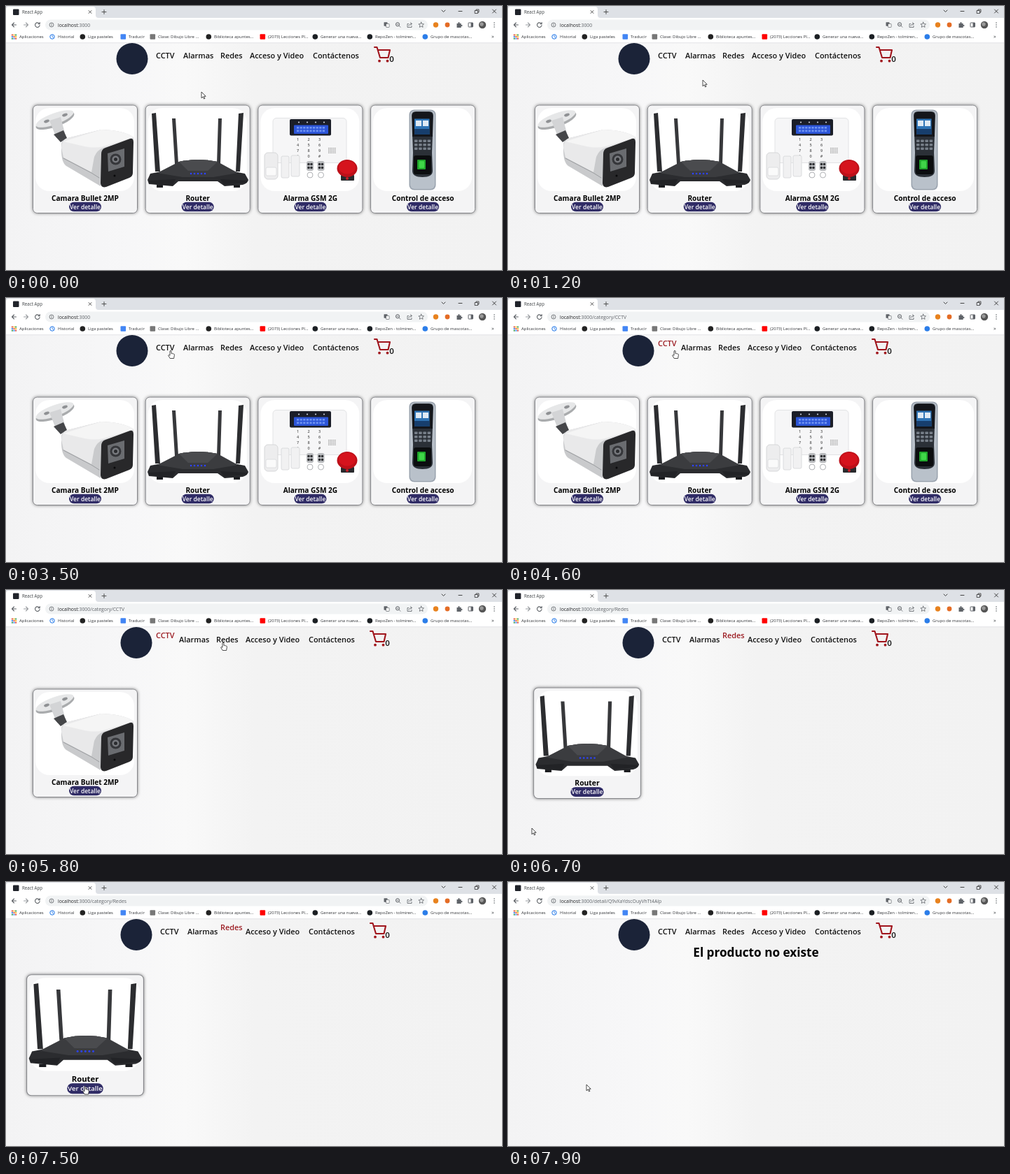
Write an HTML page that moves like this. It is 708 by 378 pixels and loops after 8 s.

```html
<!DOCTYPE html>
<html lang="es">
<head>
<meta charset="utf-8">
<title>React App</title>
<style>
html, body { margin: 0; width: 100%; height: 100%; overflow: hidden; }
svg { display: block; font-family: "Open Sans", "Noto Sans", sans-serif; }
.nav text { font-size: 10.9px; font-weight: 600; fill: #111; }
.nav text.on { fill: #9c1c22; }
.ui { fill: none; stroke: #5f6368; stroke-width: 1; }
</style>
</head>
<body>
<svg id="stage" width="708" height="378" viewBox="0 0 708 378"></svg>
<script>
const STEP = 160.7, LOOP = 8000, TICK = 100;

const text = (x, y, s, size, extra = '') =>
  `<text x="${x}" y="${y}" font-size="${size}" ${extra}>${s}</text>`;
const rect = (x, y, w, h, fill, r = 0, extra = '') =>
  `<rect x="${x}" y="${y}" width="${w}" height="${h}" fill="${fill}" rx="${r}" ${extra}/>`;
const dot = (x, y, r, fill, extra = '') =>
  `<circle cx="${x}" cy="${y}" r="${r}" fill="${fill}" ${extra}/>`;
const oval = (x, y, rx, ry, fill, turn = 0) =>
  `<ellipse rx="${rx}" ry="${ry}" fill="${fill}" transform="translate(${x} ${y}) rotate(${turn})"/>`;
const path = (d, fill, extra = '') => `<path d="${d}" fill="${fill}" ${extra}/>`;
const line = (d, color, w = 1) =>
  path(d, 'none', `stroke="${color}" stroke-width="${w}" stroke-linecap="round" stroke-linejoin="round"`);
const grid = (cols, rows, cell) =>
  Array.from({ length: cols * rows }, (_, i) => cell(i % cols, Math.floor(i / cols), i)).join('');

// ---- Browser window ----
function bookmarks() {
  const apps = ['#d93025', '#f9ab00', '#1e8e3e', '#1a73e8'];
  const appIcon = grid(3, 3, (c, r, i) => rect(8 + c * 2.6, 40.6 + r * 2.6, 1.8, 1.8, apps[i % 4]));
  const clock = dot(66, 44, 3.2, 'none', 'stroke="#1a73e8"') + line('M66 42v2l1.5 1', '#1a73e8', .8);
  const items = [
    [19, 'Aplicaciones'], [74, 'Historial'],
    [117, 'Liga pasteles', '#222', 4], [175, 'Traducir', '#4285f4', 1],
    [217, 'Clase: Dibujo Libre ...', '#777', 1], [297, 'Biblioteca apuntes...', '#222', 4],
    [374, '(2073) Lecciones PI...', '#f00', 1], [449, 'Generar una nueva...', '#1b1f23', 4],
    [527, 'RepoZen - tolmiren...', '#1b1f23', 4], [606, 'Grupo de mascotas...', '#2b7de9', 4],
  ];
  return appIcon + clock + items.map(([x, s, color, r]) =>
    (color ? rect(x - 11.5, 40.2, 7.6, 7.6, color, r) : '') + text(x, 46.2, s, 6, 'fill="#303236"')).join('');
}

function browser() {
  return rect(0, 0, 708, 17, '#dee1e6') + rect(0, 17, 708, 36, '#fff') +
    path('M0 17V5q0-4 4-4H124q4 0 4 4v8q0 4 4 4z', '#fff') +
    rect(10, 4.5, 8.5, 8.5, '#20232a', 1) + text(23, 11, 'React App', 6.2, 'fill="#3c4043"') +
    line('M118 6.5l4 4m0-4l-4 4M137 8.5h6m-3-3v6', '#444', .9) +
    line('M622 6l2.5 2.5L627 6M646 7.5h5M694.5 5l5 5m0-5l-5 5', '#333', .9) +
    line('M669.5 6.5h4v4h-4zM671 6.5v-1.5h4v4h-1.5', '#333', .8) +
    line('M14.5 27h-6m3-3l-3 3 3 3', '#5f6368', 1.1) + line('M25.5 27h6m-3-3l3 3-3 3', '#9a9da1', 1.1) +
    line('M47.5 25.2a3.3 3.3 0 1 0 .6 2.3M48.2 23.5v2.2h-2.2', '#5f6368', 1.1) +
    rect(56, 19.5, 546, 15, '#f1f3f4', 7.5) +
    dot(65, 27, 3, 'none', 'class="ui" style="stroke-width:.8"') + line('M65 26.7v1.7M65 25.3v.1', '#5f6368', .8) +
    `<text x="74" y="29.5" font-size="6.85" fill="#5f6368"><tspan fill="#202124">localhost</tspan>:3000<tspan id="url"></tspan></text>` +
    rect(539.5, 23.2, 5, 5.5, '#5f6368', .6) + rect(542.5, 25.5, 4.6, 5, '#fff', .6, 'stroke="#5f6368" stroke-width=".7"') +
    dot(559, 26.3, 2.6, 'none', 'class="ui"') + line('M561 28.3l2 2M557.8 26.3h2.4', '#5f6368', .8) +
    line('M574.5 25.5h-1.5v5h6v-2M575 28.5q0-3 4-3m-1.5-1.8l2 1.8-2 1.8', '#5f6368', .8) +
    line('M592.7 23.2l1.1 2.5 2.7.2-2 1.8.6 2.7-2.4-1.4-2.4 1.4.6-2.7-2-1.8 2.7-.2z', '#5f6368', .8) +
    dot(613.5, 27, 3.7, '#e8821e') + dot(630, 27, 3.4, '#e46c25') +
    path('M643.5 25h2q-.5-2 1-2t1 2h2.2v2.2q1.8-.6 1.8 .8t-1.8.8V31h-6.2z', '#5f6368') +
    rect(660, 24, 6.5, 6, 'none', .5, 'class="ui"') + rect(663.5, 24, 3, 6, '#5f6368') +
    dot(680, 27, 5.2, '#555') + dot(679, 26, 2.7, '#999') +
    [24, 27, 30].map(y => dot(697, y, .8, '#5f6368')).join('') +
    bookmarks() + text(693, 46.2, '»', 7, 'fill="#3c4043"') + rect(0, 52.4, 708, .8, '#dcdde0');
}

// ---- Products, each drawn in its own column ----
const camera =
  oval(70, 164, 29, 9, '#a9abad', -20) + oval(69.5, 161.5, 28.5, 8, '#e6e7e8', -20) +
  oval(58, 165, 4, 2, '#8f9194', -20) + oval(84, 156, 4, 2, '#8f9194', -20) +
  path('M62 164L78 159L84 182L72 189Z', '#d3d4d6') + path('M68 184L82 178L87 189L78 195Z', '#454649') +
  path('M79 199Q79 192 88 189L136 177Q168 178 182 188L181 200L138 212L135 258L86 229Q79 224 79 206Z', '#c9cacc') +
  path('M79 203Q79 192 88 189L136 177Q168 178 182 188L180 193L139 203Q130 206 126 216L122 238L82 217Z', '#e9e9ea') +
  path('M82 194L136 177Q168 178 182 188L139 201Q126 204 112 201Z', '#f5f5f5') +
  line('M82 218L122 239L133 246', '#9b9da0') +
  path('M136 212Q136 205 142 203L177 190Q182 189 182 195L181 239Q181 244 176 246L143 259Q135 261 135 253Z', '#28282a') +
  path('M145 211L169 204V230L146 237Z', '#6a6c70') + dot(156.5, 219.5, 8, '#35363a') +
  dot(156.5, 219.5, 5, '#77797e') + dot(156.5, 219.5, 2.5, '#2b2c2f') + dot(155, 243, 1.5, '#08080a');

const router =
  path('M208 154l6-1 6 84h-7zM332 154l7-1-5 84h-6z', '#2c2d30') +
  path('M237 161l5 0 4 65h-5zM303 161l5 0-2 65h-5z', '#37383b') +
  path('M202 249L206 240L232 235L247 223Q274 217 302 223L315 235L341 240L346 249Q345 254 338 256L312 258L302 251H246L238 258L204 255Z', '#2b2c2f') +
  path('M216 239L247 223Q274 217 302 223L331 239L296 245H252Z', '#3b3c3f') +
  path('M247 223Q274 217 302 223L288 236H260Z', '#4a4b4e') +
  path('M204 250l38-2-4 9-34-3zM344 250l-38-2 5 8 33-3z', '#222326') +
  path('M215 256h9v4h-9zM325 256h9v4h-9z', '#1c1d20') +
  [264, 269, 274, 279, 284].map(x => dot(x, 240, 1.3, '#2d43ff')).join('');

const remote = x => dot(x, 242, 4, 'none', 'stroke="#b0b2b5"') + rect(x - 5, 222, 10, 14, '#b9bbbe', 3) +
  grid(2, 2, (c, r) => dot(x - 2 + c * 4, 226.5 + r * 5, 1.7, '#2c2d30'));
const alarm =
  rect(381, 160.5, 105, 64, '#f6f6f7', 5, 'stroke="#e2e3e5"') +
  rect(405, 162, 59, 23.5, '#1b1e28', 2) + rect(411, 170.5, 49, 12.5, '#2c55d8', 1) +
  grid(9, 2, (c, r) => rect(415 + c * 4.6, 173 + r * 4.5, 3.2, 2.6, '#6f93f2')) +
  [418, 430, 442, 454].map(x => dot(x, 166.5, 1.1, '#c9cdd8')).join('') +
  grid(3, 4, (c, r, i) => text(416.5 + c * 15.5, 193.2 + r * 8, '123456789*0#'[i], 5.5, 'fill="#555" text-anchor="middle" font-weight="600"')) +
  grid(5, 4, (c, r) => rect(460 + c * 2.3, 203 + r * 2.2, 1.4, 1.2, '#999')) +
  rect(369, 210, 19, 38, '#ededee', 5, 'stroke="#d6d7d9"') + rect(371, 231, 15, 12, '#fafafa', 2, 'stroke="#dedfe1"') +
  rect(393, 215, 11, 31, '#f1f1f2', 2, 'stroke="#dadbdd"') + rect(407, 214, 12, 30, '#f1f1f2', 2, 'stroke="#dadbdd"') +
  [434, 449.5].map(remote).join('') +
  rect(478, 242, 19, 8, '#292a2d', 1) + dot(487, 247, 2, '#c51f28') +
  oval(487, 232.5, 14.5, 12.5, '#bd1019') + oval(487, 231, 12, 9.5, '#d5131d');

const access =
  rect(575.5, 148.5, 38, 115, '#9aa3ae', 7) + rect(577, 150, 35, 112, '#b9c1ca', 6) +
  path('M579 157q0-6 6-6h19q6 0 6 6l-2 53 1 26q0 9-14.500 9t-14.500-9l1-26z', '#2b3037') +
  path('M580 157q0-5 5-5h19q5 0 5 5v30h-29z', '#14161b') +
  rect(583, 161.5, 21.5, 22.5, '#2f74b5') + rect(585, 164, 8, 8, '#dfeaf4') + rect(595, 164, 8, 8, '#dfeaf4') +
  rect(583, 176, 21.5, 8, '#173e6d') +
  grid(4, 3, (c, r) => rect(583 + c * 6.2, 191.5 + r * 5.5, 4.5, 3.5, '#777f89', .7)) +
  rect(582, 214, 25, 27, '#0b0d0f', 3) + rect(587, 220, 12, 14, '#1fa52b', 1) + rect(589.5, 222, 7.5, 10, '#3fd648', 1);

const products = [['Camara Bullet 2MP', camera], ['Router', router], ['Alarma GSM 2G', alarm], ['Control de acceso', access]];

function card([name, art], i) {
  const x = 38.5 + STEP * i, mid = x + 74.5;
  return `<g class="card">` + rect(x, 142, 149, 154.5, '#f4f4f5', 6, 'stroke="#85868a" filter="url(#shadow)"') +
    rect(x + 3.5, 146, 141, 119, '#fff', 20) + art +
    text(mid, 278.6, name, 10.1, 'font-weight="700" fill="#000" text-anchor="middle"') +
    rect(mid - 23, 280.8, 46, 13.4, '#302c66', 6.7) +
    text(mid, 290.7, 'Ver detalle', 8.5, 'font-weight="600" fill="#fff" text-anchor="middle"') + `</g>`;
}

// ---- Page ----
const links = [['CCTV', 214], ['Alarmas', 253], ['Redes', 306], ['Acceso y Video', 348], ['Contáctenos', 438]];
const cart = line('M526 59h3.5l4.5 15h11.5l2.5-11H531', '#a0141c', 2.1) +
  dot(533, 78.7, 1.9, '#a0141c') + dot(544.5, 78.7, 1.9, '#a0141c') +
  `<text x="547.3" y="80.2" style="font-size:11.5px">0</text>`;

const stage = document.getElementById('stage');
stage.innerHTML = `<defs>
  <linearGradient id="bg"><stop offset="0" stop-color="#f3f3f4"/><stop offset=".25" stop-color="#f7f7f8"/>
    <stop offset=".36" stop-color="#f9f9f9"/><stop offset=".5" stop-color="#f3f3f3"/><stop offset="1" stop-color="#f2f2f2"/></linearGradient>
  <filter id="shadow" x="-10%" y="-10%" width="120%" height="120%"><feDropShadow dx="0" dy="0" stdDeviation="2" flood-opacity=".5"/></filter>
</defs>` + rect(0, 0, 708, 378, 'url(#bg)') + browser() +
  `<g class="nav"><g id="logo">${dot(180, 75.5, 22.5, '#1b2338')}</g>` +
  links.map(([s]) => `<text class="link">${s}</text>`).join('') + `<g id="cart">${cart}</g></g>` +
  `<g id="cards">${products.map(card).join('')}</g>` +
  `<g id="missing">${text(354, 107.3, 'El producto no existe', 17.2, 'font-weight="700" text-anchor="middle"')}</g>` +
  `<g id="arrow">${path('M0 0V8.8L2.1 6.9L3.5 10L4.9 9.4L3.5 6.3H6.2Z', '#fff', 'stroke="#222" stroke-width=".8"')}</g>` +
  `<g id="hand">${path('M-1 1Q0-.6 1 1V4.5Q2 3.8 2.6 4.8Q3.6 4.2 4.2 5.2Q5.5 5 5.4 6.5L4.6 11.5H-.8L-3.4 7.2Q-3 5.8-1 7.2Z', '#fff', 'stroke="#222" stroke-width=".8" stroke-linejoin="round"')}</g>`;

const el = id => document.getElementById(id);
const linkEls = [...document.querySelectorAll('.link')], cardEls = [...document.querySelectorAll('.card')];
const show = (node, on) => { node.style.display = on ? '' : 'none'; };
const shift = (node, x, y = 0) => node.setAttribute('transform', `translate(${x} ${y})`);

// ---- Timeline ----
const pointer = [
  [0, 279, 123], [100, 279, 123], [500, 282, 118], [700, 282, 118], [1000, 278, 106], [1200, 278, 106],
  [2000, 250, 60], [2300, 235, 51], [2600, 232, 72], [2900, 232, 72], [3500, 235, 75], [3800, 235, 75],
  [4300, 238, 75], [5100, 238, 75], [5500, 276, 77], [5800, 310, 75], [6500, 310, 75], [6600, 130, 230],
  [6700, 34, 341], [6900, 38, 340], [7350, 108, 301], [7500, 113, 292.5], [7700, 113, 292.5], [7900, 112, 290],
];
const zoom = [
  [0, 1], [6550, 1], [6630, 1.05], [6770, 1], [7350, 1], [7400, 1.025],
  [7450, 1.08], [7500, 1.12], [7550, 1.138], [7650, 1.15],
];

function at(keys, t) {
  const i = keys.findIndex(k => k[0] > t);
  if (i < 0) return keys.at(-1).slice(1);
  const a = keys[i - 1], b = keys[i], p = (t - a[0]) / (b[0] - a[0]);
  return a.slice(1).map((v, j) => v + (b[j + 1] - v) * p);
}

function draw(t) {
  const detail = t >= 7700;
  const [active, since] = detail || t < 4300 ? [-1, 0] : t < 6000 ? [0, 4300] : [2, 6000];
  el('url').textContent = detail ? '/detail/Q9vXaYdscOuyVhTt4Alp' : active < 0 ? '' : '/category/' + links[active][0];

  const lift = 6 * Math.min(1, (t - since + TICK) / 300);
  linkEls.forEach((node, i) => {
    const on = i === active, dx = active < 0 ? 0 : 6 * Math.sign(active - i);
    node.classList.toggle('on', on);
    shift(node, links[i][1] + dx, 75 - (on ? lift : 0));
  });
  shift(el('logo'), active < 0 ? 0 : 6);
  shift(el('cart'), active < 0 ? 0 : -6);

  const only = t < 4900 ? -1 : t < 6400 ? 0 : 1, [scale] = at(zoom, t);
  cardEls.forEach((node, i) => {
    show(node, !detail && (only < 0 || only === i));
    node.setAttribute('transform', only < 0 ? '' :
      `translate(113 219) scale(${scale}) translate(${-113 - STEP * i} -219)`);
  });
  show(el('missing'), detail);

  const hand = (t >= 2600 && t < 6600) || (t >= 7400 && t < 7700);
  show(el('hand'), hand);
  show(el('arrow'), !hand);
  shift(el(hand ? 'hand' : 'arrow'), ...at(pointer, t));
}

const start = performance.now();
function frame() {
  const t = (performance.now() - start) % LOOP;
  draw(Math.floor(t / TICK) * TICK);
  requestAnimationFrame(frame);
}
frame();
</script>
</body>
</html>
```
